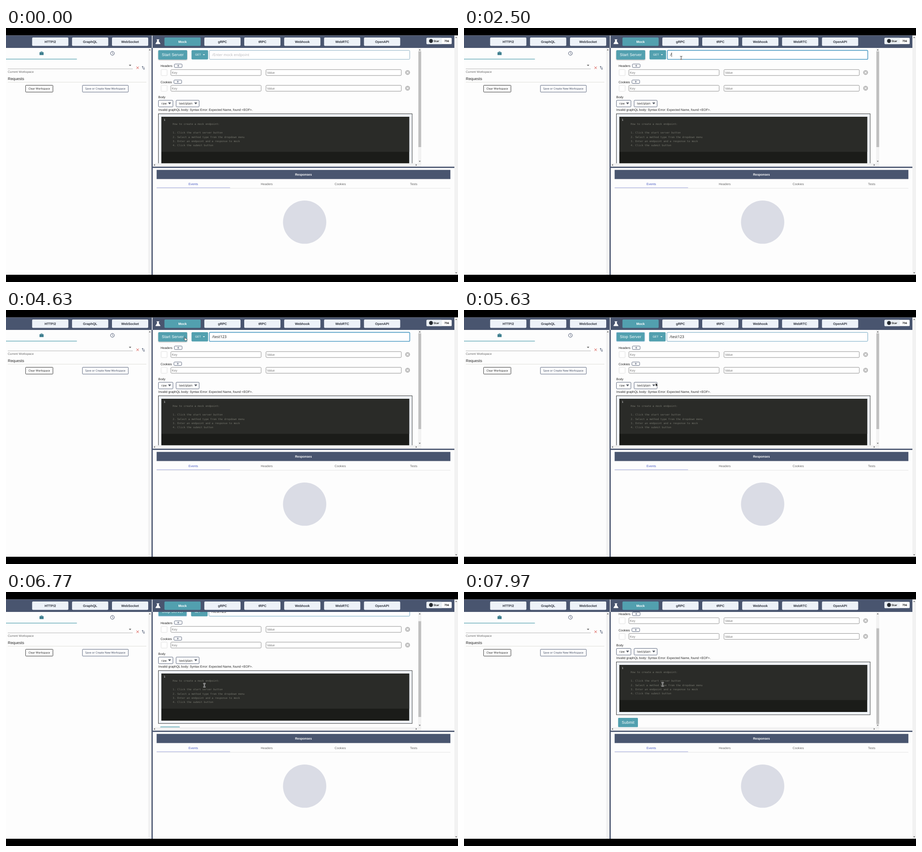
An HTML page that plays this animation: 998x561 px, repeating every 8 s.

```html
<!DOCTYPE html>
<html lang="en">
<head>
<meta charset="utf-8">
<title>Mock server</title>
<style>
html, body { margin: 0; width: 100%; height: 100%; overflow: hidden; background: #000; }
svg { display: block; width: 998px; height: 561px; }
text { font: 6.93px "Liberation Sans", Arial, sans-serif; fill: #222; text-rendering: geometricPrecision; white-space: pre; }
.noto { font-family: "Noto Sans", sans-serif; }
.mid { text-anchor: middle; }
.tabs text { font-size: 7.28px; font-weight: bold; text-anchor: middle; fill: #2b303a; }
.code text { font: 5.74px "DejaVu Sans Mono", monospace; fill: #77786f; }
.big { font-size: 8.75px; letter-spacing: .14px; fill: #fff; text-anchor: middle; }
.hint { fill: #757575; }
.bar { fill: #49556f; }
.teal { fill: #52a0af; }
.track { fill: #f2f2f2; }
.box { fill: #fff; stroke: #49556f; stroke-width: .9; }
.icon { fill: none; stroke: #49556f; }

.scroll, .thumb, .field, .shift, .start, .stop, .pointer, .pointer g {
  animation: 8s infinite;
}
.scroll { animation-name: scroll; }
.thumb { animation-name: thumb; }
.field { animation-name: field; animation-timing-function: step-end; }
.shift { animation-name: shift; animation-timing-function: step-end; }
.start { animation-name: start; animation-timing-function: step-end; }
.stop { animation-name: stop; animation-timing-function: step-end; }
.pointer { animation-name: travel; animation-timing-function: ease-in-out; }
.pointer g { animation-timing-function: step-end; }
.pointer .beam { animation-name: beam; }
.pointer .hand { animation-name: hand; }
.pointer .arrow { animation-name: arrow; }

@keyframes scroll {
  0%, 83.75% { transform: translateY(0); }
  86.6% { transform: translateY(-29.6px); }
  88%, 100% { transform: translateY(-35px); }
}
@keyframes thumb {
  0%, 83.75% { transform: translateY(0); }
  86.6% { transform: translateY(24.3px); }
  88%, 100% { transform: translateY(28.7px); }
}
@keyframes field {
  0% { x: 449px; width: 442.5px; stroke: #7fa5bd; stroke-width: .9; }
  10.6% { x: 449px; width: 442.5px; stroke: #4f9cc4; stroke-width: 1.6; }
  60.6%, 100% { x: 448px; width: 443.5px; stroke: #6ba3c0; stroke-width: 1; }
}
@keyframes shift { 0% { transform: none; } 60.6%, 100% { transform: translateX(-1px); } }
@keyframes start { 0% { visibility: visible; } 60.6%, 100% { visibility: hidden; } }
@keyframes stop { 0% { visibility: hidden; } 60.6%, 100% { visibility: visible; } }
@keyframes travel {
  0%, 7.5% { transform: translate(500px, 84px); }
  9.5%, 20% { transform: translate(481px, 66px); }
  24%, 48% { transform: translate(479.5px, 66px); }
  56.5%, 62.5% { transform: translate(396px, 63.5px); }
  76%, 82.5% { transform: translate(438px, 215px); }
  85.5% { transform: translate(438px, 204px); }
  100% { transform: translate(438.5px, 204px); }
}
@keyframes beam {
  0% { visibility: hidden; } 7.5% { visibility: visible; }
  51% { visibility: hidden; } 74%, 100% { visibility: visible; }
}
@keyframes hand {
  0% { visibility: hidden; } 51% { visibility: visible; } 64%, 100% { visibility: hidden; }
}
@keyframes arrow {
  0% { visibility: hidden; } 64% { visibility: visible; } 74%, 100% { visibility: hidden; }
}
</style>
</head>
<body>
<svg viewBox="0 0 998 561">
  <defs>
    <rect id="tab" x="-40" y="21" width="80" height="18.5" rx="2"/>
    <path id="up" d="M-2 1.2 L0 -1.2 L2 1.2z" fill="#555"/>
    <path id="drop" d="M-3.4 -2 H3.4 L0 2.2z" fill="#555b66"/>
    <g id="plus">
      <rect class="box" width="17" height="7.6" rx="1.6"/>
      <path class="icon" stroke-width=".8" d="M6.2 3.8 H10.8 M8.5 1.5 V6.1"/>
    </g>
    <g id="row">
      <rect x="342.5" y="-6.5" width="13.2" height="13.2" rx="1" fill="#fff" stroke="#d9d9d9" stroke-width=".8"/>
      <rect x="364" y="-6.4" width="199.3" height="13" rx="1.8" fill="#fff" stroke="#858585" stroke-width=".9"/>
      <rect x="574" y="-6.4" width="298.8" height="13" rx="1.8" fill="#fff" stroke="#858585" stroke-width=".9"/>
      <text class="hint" x="366.3" y="2.7">Key</text>
      <text class="hint" x="576.2" y="2.7">Value</text>
      <circle cx="886.7" r="5.4" fill="#bdbdbd"/>
      <path d="M884.5 -2.2 l4.4 4.4 m0 -4.4 l-4.4 4.4" stroke="#fff" stroke-width="1.1"/>
    </g>
    <clipPath id="pane"><rect x="324" y="44" width="586" height="254.5"/></clipPath>
    <filter id="shade" x="-10%" y="-20%" width="120%" height="160%">
      <feDropShadow dx="0" dy="1" stdDeviation="1" flood-opacity=".35"/>
    </filter>
  </defs>

  <rect width="998" height="561"/>
  <rect y="16.5" width="998" height="528.5" fill="#fdfdfd"/>

  <!-- top bar -->
  <path class="bar" d="M0 16.5 H322 V44 H0z M323.5 16.5 H990 V44 H323.5z"/>
  <g class="tabs" fill="#edf2f8">
    <g transform="translate(97.7)"><use href="#tab"/><text y="32.7">HTTP/2</text></g>
    <g transform="translate(185.8)"><use href="#tab"/><text y="32.7">GraphQL</text></g>
    <g transform="translate(274)"><use href="#tab"/><text y="32.7">WebSocket</text></g>
    <g transform="translate(389.8)"><use href="#tab" class="teal"/><text y="32.7" style="fill:#fff">Mock</text></g>
    <g transform="translate(477.9)"><use href="#tab"/><text y="32.7">gRPC</text></g>
    <g transform="translate(566)"><use href="#tab"/><text y="32.7">tRPC</text></g>
    <g transform="translate(654.2)"><use href="#tab"/><text y="32.7">Webhook</text></g>
    <g transform="translate(742.3)"><use href="#tab"/><text y="32.7">WebRTC</text></g>
    <g transform="translate(830.4)"><use href="#tab"/><text y="32.7">OpenAPI</text></g>
  </g>
  <path d="M332.6 25 H338.4 V26.2 H337.4 V29.2 L340.8 34.2 Q341.2 35.5 340 35.5 H331 Q329.8 35.5 330.2 34.2 L333.6 29.2 V26.2 H332.6z" fill="#fff"/>
  <rect x="928.5" y="21.8" width="55.5" height="13.8" rx="1.6" fill="#fff"/>
  <rect x="928.5" y="21.8" width="34" height="13.8" rx="1.6" fill="#ebf0f4"/>
  <circle cx="938.4" cy="28.6" r="4.3" fill="#24292f"/>
  <text class="noto" x="944.3" y="31" style="font-size:6px;font-weight:600">Star</text>
  <text class="noto mid" x="973" y="31" style="font-size:6.2px;font-weight:600">756</text>

  <!-- workspace panel -->
  <rect class="track" x="314" y="44" width="7.5" height="501"/>
  <use href="#up" x="317.5" y="48"/>
  <rect class="bar" x="321.3" y="44" width="2.7" height="501"/>
  <path d="M0 68.6 H156.5" stroke="#52a0af" stroke-width="1.2"/>
  <path d="M74 53.5 H83 V59.8 H74z M76.6 53.5 V51.8 H80.4 V53.5 H79.5 V52.7 H77.5 V53.5z" fill="#3f7f8f"/>
  <g class="icon" stroke="#555"><circle cx="235" cy="56" r="4.2"/><path d="M235 53.2 V56.3 L237.2 57.6" stroke-width=".8"/></g>
  <path d="M4 90.3 H280" stroke="#969696" stroke-width=".7"/>
  <path d="M271.3 81.3 H276.7 L274 84z" fill="#555"/>
  <path d="M288 85.2 l5.2 5.2 m0 -5.2 l-5.2 5.2" stroke="#d23b33" stroke-width="1"/>
  <path class="icon" stroke-width=".9" d="M301.6 89.5 V84.3 M300 86 L301.6 84.3 L303.2 86 M304.6 86 V91.5 M303 89.8 L304.6 91.5 L306.2 89.8"/>
  <text x="4" y="99.2" style="font-size:6.65px;fill:#666">Current Workspace</text>
  <text x="4" y="115.3" style="font-size:8.5px">Requests</text>
  <path d="M4 119.7 H310" stroke="#d6d6ce" stroke-width=".8"/>
  <rect class="box" x="43.3" y="126.5" width="60.3" height="15" rx="1" style="stroke:#222"/>
  <text class="noto mid" x="73.4" y="136.2" style="font-size:6.1px">Clear Workspace</text>
  <rect class="box" x="168.8" y="126.5" width="101.2" height="15" rx="1"/>
  <text class="noto mid" x="219.4" y="136.2" style="font-size:6.1px;fill:#39445c">Save or Create New Workspace</text>

  <!-- request form -->
  <g clip-path="url(#pane)">
    <g class="scroll">
      <g class="start">
        <rect class="teal" x="336.2" y="49" width="63.8" height="20.7" rx="2" filter="url(#shade)"/>
        <text class="big" x="368.2" y="62.2">Start Server</text>
      </g>
      <g class="stop">
        <rect class="teal" x="336.5" y="49.3" width="62.5" height="20" rx="2" stroke="#a5c8e2" stroke-width="1.2"/>
        <text class="big" x="367.8" y="62.2">Stop Server</text>
      </g>
      <rect class="field" x="449" y="49.4" width="442.5" height="19.8" rx="2" fill="#fff"/>
      <g class="shift">
        <rect class="teal" x="409.6" y="49" width="36.6" height="20.5" rx="2"/>
        <text x="417.5" y="61.4" style="font-size:6.2px;fill:#fff">GET</text>
        <path d="M434.6 57.9 H439.2 L437 60.3z" fill="#fff"/>
        <text id="hint" class="noto" x="455" y="62.2" style="font-size:8.05px;fill:#b9b9bd">/Enter mock endpoint</text>
        <text id="typed" class="noto" x="455" y="62.2" style="font-size:8.32px"></text>
        <rect id="caret" y="54.2" width=".8" height="9.6" fill="#222"/>
      </g>

      <text x="341.3" y="86.4">Headers</text>
      <use href="#plus" x="371.8" y="79.6"/>
      <use href="#row" y="98.3"/>
      <text x="341.3" y="121.6">Cookies</text>
      <use href="#plus" x="370.8" y="114.9"/>
      <use href="#row" y="133"/>
      <text x="336.3" y="154.6">Body</text>
      <rect class="box" x="336.6" y="159.6" width="32" height="14.6" rx="1.5"/>
      <text class="noto" x="343" y="169.4" style="font-size:6.7px">raw</text>
      <use href="#drop" x="361.2" y="166.6"/>
      <rect class="box" x="375.6" y="159.6" width="50.8" height="14.6" rx="1.5"/>
      <text class="noto" x="382" y="169.4" style="font-size:6.7px">text/plain</text>
      <use href="#drop" x="419" y="166.6"/>
      <text x="336.3" y="182.6">Invalid graphQL body: Syntax Error: Expected Name, found &lt;EOF&gt;.</text>

      <rect x="336.5" y="189.5" width="560.3" height="116.6" fill="#f1f5fb" stroke="#222" stroke-width=".9"/>
      <rect x="343" y="196" width="547.3" height="104" fill="#1b1c19"/>
      <rect x="343" y="196" width="547.3" height="77.6" fill="#2a2b28"/>
      <g class="code">
        <text x="348.3" y="204.8" style="fill:#fff">1</text>
        <text x="368" y="214">How to create a mock endpoint:</text>
        <text x="368" y="233.2">1. Click the start server button</text>
        <text x="368" y="242.6">2. Select a method type from the dropdown menu</text>
        <text x="368" y="251.9">3. Enter an endpoint and a response to mock</text>
        <text x="368" y="261.2">4. Click the submit button</text>
      </g>
      <rect class="teal" x="340.3" y="313" width="43.7" height="20.4" rx="1.5"/>
      <text class="big" x="362.2" y="326.1">Submit</text>
    </g>
  </g>
  <path class="track" d="M910 44 H917 V306 H324 V298.8 H910z"/>
  <rect class="thumb" x="910.6" y="51.5" width="6" height="211.5" fill="#bfbfbf"/>
  <use href="#up" x="913.5" y="48"/>
  <use href="#up" transform="translate(913.5 294.6) scale(1 -1)"/>
  <use href="#up" transform="translate(327.6 302.5) rotate(-90)"/>
  <use href="#up" transform="translate(906 302.5) rotate(90)"/>

  <!-- responses -->
  <rect class="bar" x="322" y="306.3" width="668" height="2.8"/>
  <rect class="bar" x="332.6" y="313.4" width="648.6" height="20.2"/>
  <text class="mid" x="656.8" y="326" style="font-weight:bold;fill:#fff">Responses</text>
  <g class="mid">
    <text x="413.5" y="346.5" style="fill:#4a5cc4">Events</text>
    <text x="575.7" y="346.5" style="fill:#666">Headers</text>
    <text x="737.9" y="346.5" style="fill:#666">Cookies</text>
    <text x="900.1" y="346.5" style="fill:#666">Tests</text>
  </g>
  <path d="M332.6 354 H981.2" stroke="#dfdfdf" stroke-width=".9"/>
  <path d="M332.6 352.8 H494.7" stroke="#9fa4dc" stroke-width="1.1"/>
  <circle cx="659.4" cy="428.8" r="47.8" fill="#dadce5"/>

  <rect class="track" x="990" y="16.5" width="8" height="528.5"/>
  <use href="#up" x="994" y="20.6"/>
  <use href="#up" transform="translate(994 541) scale(1 -1)"/>

  <g class="pointer">
    <g class="beam" fill="none">
      <path id="stem" d="M-2.3 -3.7 Q0 -3.7 0 -2.6 Q0 -3.7 2.3 -3.7 M0 -2.6 V2.6 M-2.3 3.7 Q0 3.7 0 2.6 Q0 3.7 2.3 3.7" stroke="#fff" stroke-width="2.1"/>
      <use href="#stem" style="stroke:#111"/>
      <path d="M-2.3 -3.7 Q0 -3.7 0 -2.6 Q0 -3.7 2.3 -3.7 M0 -2.6 V2.6 M-2.3 3.7 Q0 3.7 0 2.6 Q0 3.7 2.3 3.7" stroke="#111" stroke-width=".9"/>
    </g>
    <g class="hand">
      <path d="M-2.2 -3 Q-1.6 -4 -.8 -3 L.3 -.8 L2.8 0 Q3.8 .4 3.6 1.8 L3 4 H-.6 L-3 1.2 Q-3 .2 -1.6 .8z" fill="#fff" stroke="#111" stroke-width=".7"/>
    </g>
    <g class="arrow">
      <path d="M0 0 V8 L1.9 6.3 L3.1 9 L4.3 8.4 L3.1 5.9 H5.6z" fill="#111" stroke="#fff" stroke-width=".6"/>
    </g>
  </g>
</svg>
<script>
const LOOP = 8000, FOCUS = 850, BLUR = 4850, BLINK = 500;
const message = "/test123";
const keyTimes = [2400, 2700, 2830, 2950, 3080, 3350, 3500, 3650];
const [hint, typed, caret] = ["hint", "typed", "caret"].map(id => document.getElementById(id));
let origin;

function draw(now) {
  origin ??= now;
  const t = (now - origin) % LOOP;
  const pressed = keyTimes.filter(time => time <= t);
  typed.textContent = message.slice(0, pressed.length);
  hint.style.visibility = pressed.length ? "hidden" : "visible";

  // Each key press restarts the blink.
  const since = t - (pressed.at(-1) ?? FOCUS);
  const lit = t >= FOCUS && t < BLUR && since % (2 * BLINK) < BLINK;
  caret.style.visibility = lit ? "visible" : "hidden";
  caret.setAttribute("x", 455.2 + typed.getComputedTextLength());
  requestAnimationFrame(draw);
}
requestAnimationFrame(draw);
</script>
</body>
</html>
```
